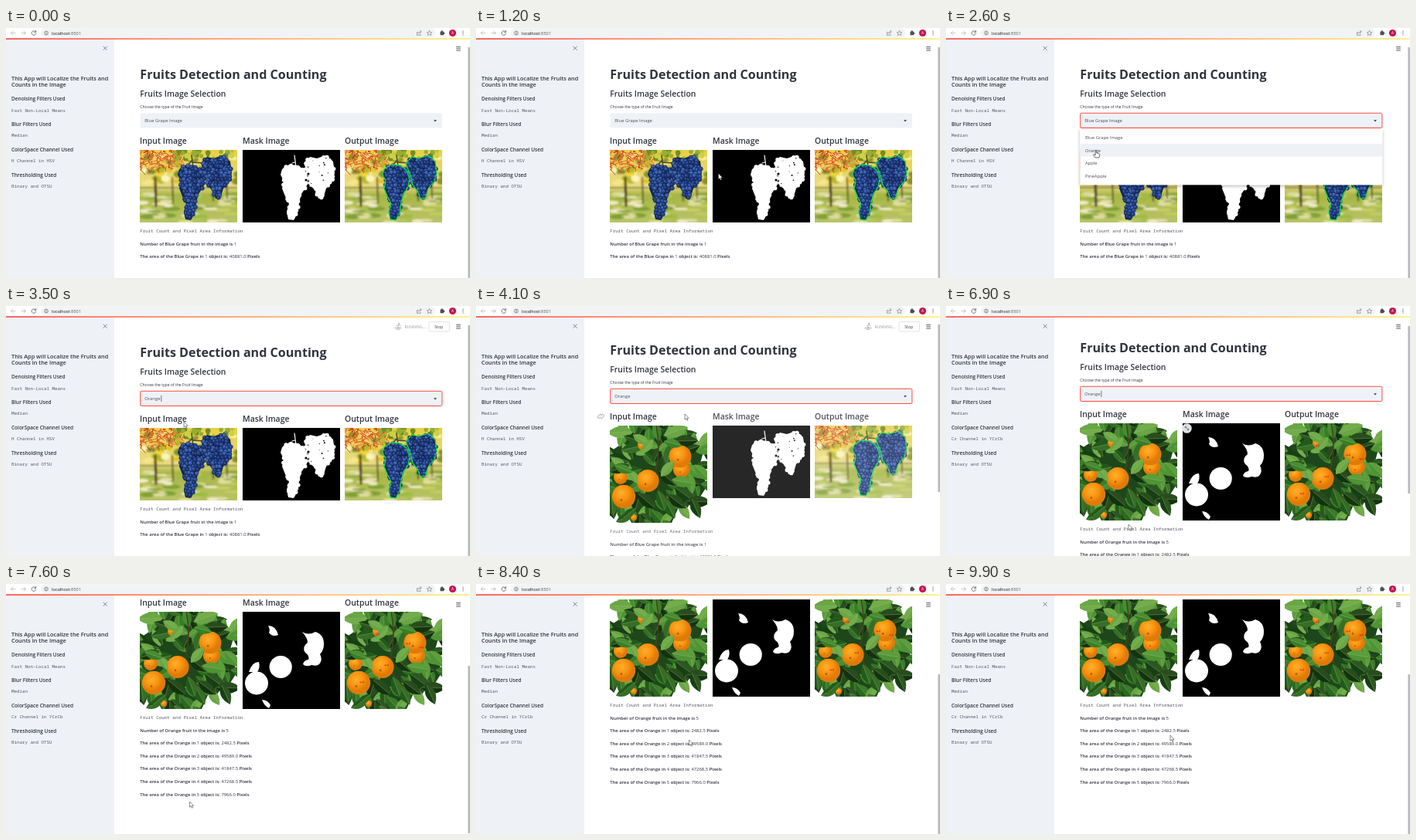
Write an HTML page that moves like this. It is 600 px wide and 324 px high and loops after 10 s.

```html
<!DOCTYPE html>
<html lang="en">
<head>
<meta charset="utf-8">
<title>Fruits Detection and Counting</title>
<style>
html, body { margin: 0; width: 100%; height: 100%; overflow: hidden; background: #fff; }
svg { display: block; width: 600px; height: 324px; }
text { font-family: "Open Sans", "Noto Sans", sans-serif; fill: #31333f; white-space: pre; }
.mono { font-family: "Noto Sans Mono", "Liberation Mono", monospace; font-size: 5.85px; fill: #555863; }
.url { font-family: Roboto, sans-serif; font-size: 5.8px; }
.h1 { font-size: 16.1px; font-weight: 700; }
.h2 { font-size: 10.45px; font-weight: 600; }
.h3 { font-size: 7.32px; font-weight: 600; }
.h4 { font-size: 6.5px; font-weight: 600; }
.body { font-size: 5.88px; font-weight: 600; }
.thin { font-weight: 400; }
.opt { font-size: 5.85px; fill: #4b4d58; }
.label { font-size: 5.06px; }
</style>
</head>
<body>
<script>
const LOOP = 10000, STEP = 100;
const COLS = [173, 306, 438], IMG_Y = 158, IMG_W = 126, GRAPE_H = 94;

let seed = 7;
const rand = (a = 0, b = 1) => {
  seed = (seed * 16807) % 2147483647;
  return a + (b - a) * seed / 2147483647;
};
const pick = list => list[Math.floor(rand(0, list.length))];
const times = (n, fn) => Array.from({ length: n }, (_, i) => fn(i)).join('');

const text = (x, y, cls, str) => `<text x="${x}" y="${y}" class="${cls}">${str}</text>`;
const rect = (x, y, w, h, fill, more = '') =>
  `<rect x="${x}" y="${y}" width="${w}" height="${h}" fill="${fill}" ${more}/>`;
const circle = (x, y, r, fill, more = '') => `<circle cx="${x}" cy="${y}" r="${r}" fill="${fill}" ${more}/>`;
const path = (d, fill, more = '') => `<path d="${d}" fill="${fill}" ${more}/>`;
const line = (d, stroke, w = 0.8) => path(d, 'none', `stroke="${stroke}" stroke-width="${w}" stroke-linecap="round"`);
const group = (id, body, more = '') => `<g id="${id}" ${more}>${body}</g>`;
// Parts between bars are set in regular weight.
const mixed = (x, y, str) => text(x, y, 'body', str.split('|')
  .map((s, i) => i % 2 ? `<tspan class="thin">${s}</tspan>` : s).join(''));

// Grapes
const bunches = [
  [[51, 25], [60, 19], [71, 20], [80, 26], [84, 37], [82, 48], [76, 57], [73, 68], [71, 82], [66, 91],
   [59, 90], [57, 80], [60, 70], [55, 60], [51, 50], [53, 40], [49, 32]],
  [[79, 17], [87, 9], [96, 11], [108, 7], [117, 15], [119, 30], [116, 41], [108, 50], [104, 63], [98, 63],
   [94, 53], [88, 46], [85, 34]],
];
const inside = (poly, x, y) => poly.reduce((hit, [ax, ay], i) => {
  const [bx, by] = poly[(i + 1) % poly.length];
  return (ay > y) !== (by > y) && x < ax + (y - ay) * (bx - ax) / (by - ay) ? !hit : hit;
}, false);
const outline = poly => 'M' + poly.map(p => p.join(' ')).join('L') + 'Z';
const grapes = [];
for (const poly of bunches)
  for (let row = 0; row < 22; row++)
    for (let col = 0; col < 17; col++) {
      const x = 48 + col * 4.5 + row % 2 * 2.2 + rand(-1.2, 1.2), y = 5 + row * 4.1 + rand(-1.2, 1.2);
      if (inside(poly, x, y)) grapes.push([x, y]);
    }
const stem = line('M67 7L69 22M67 14L62 20M68 16L84 17', '#4f4a28', 1.6);

function vineyard() {
  let s = rect(0, 0, 126, 94, 'url(#field)');
  s += '<g filter="url(#soft)">' + times(75, () =>
    `<ellipse cx="${rand(0, 126)}" cy="${rand(0, 44)}" rx="${rand(3, 8)}" ry="${rand(2, 5)}" fill="${
      pick(['#f3d535', '#e2c21f', '#b4b82f', '#fbf4b8', '#84922f', '#f5e68a'])}"/>`);
  s += times(60, () =>
    `<ellipse cx="${rand(0, 126)}" cy="${rand(56, 94)}" rx="${rand(5, 12)}" ry="${rand(1, 3)}" fill="${
      pick(['#c6cf62', '#9dbb3f', '#dfdca0', '#7fa034', '#efe9c4'])}"/>`);
  s += line('M0 49H126', '#99984d', 2);
  s += [20, 42, 94, 112].map((x, i) => line(`M${x} 36L${x + 1} ${72 - i * 3}`, '#5a4a2c', i ? 1.6 : 3.2)).join('');
  s += '</g>' + times(150, () => {
    const x = rand(0, 55), y = rand(0, 30 - x * 0.18);
    return line(`M${x} ${y}l${rand(-5, 5)} ${rand(-4, 5)}l${rand(-4, 4)} ${rand(-3, 4)}`,
      pick(['#cf3320', '#e25a28', '#b8351d', '#e98735']), 0.9);
  });
  s += times(26, () => circle(rand(46, 120), rand(0, 13), rand(2, 4), pick(['#98ad32', '#ced044', '#718c2a'])));
  s += stem + bunches.map(p => path(outline(p), '#142450')).join('');
  return s + grapes.map(([x, y]) =>
    circle(x, y, 2.6, pick(['#2a4c98', '#21408a', '#375fae', '#1c3474']), 'stroke="#142450" stroke-width=".5"') +
    circle(x - 0.6, y - 0.7, 0.8, '#7396d4', 'opacity=".6"')).join('');
}
const grapeMask = () => rect(0, 0, 126, 94, '#000') + line('M67 7L69 22M64 17L68 16', '#fff', 1.2) +
  bunches.map(p => path(outline(p), '#fff')).join('') +
  grapes.map(([x, y]) => circle(x, y, 2.6, '#fff')).join('') +
  times(14, () => circle(rand(78, 114), rand(10, 44), rand(0.4, 1.1), '#000')) +
  [[85, 31], [82, 39], [88, 49]].map(([x, y]) => circle(x, y, 1.6, '#000')).join('');
const contours = () => bunches.map(p =>
  path(outline(p), 'none', 'stroke="#14db52" stroke-width="1.5" stroke-linejoin="round" stroke-dasharray="5 .6"')).join('');

// Oranges
const GREENS = ['#173f14', '#2a6a1f', '#387f27', '#4f9434', '#12330f', '#225a1a', '#6aa645'];
function leaf(x, y, angle, len, fill) {
  const w = len * 0.46;
  return `<g transform="translate(${x} ${y}) rotate(${angle})">` +
    path(`M0 0Q${len * 0.45} ${-w} ${len} 0Q${len * 0.45} ${w} 0 0`, fill) +
    path(`M0 0Q${len * 0.45} ${-w} ${len} 0Z`, '#a4cc6a', 'opacity=".16"') +
    line(`M1 0H${len - 2}`, '#9dbf73', 0.35) + '</g>';
}
const orange = (x, y, r) => circle(x, y, r, 'url(#peel)') +
  circle(x - r * 0.2, y + r * 0.3, r * 0.09, '#a85a10');
function tree() {
  const crown = [[22, 8], [34, 0], [88, 0], [100, 18], [124, 24], [116, 52], [126, 78], [112, 100],
    [88, 108], [80, 126], [34, 126], [20, 110], [0, 106], [0, 34], [12, 26]];
  let s = rect(0, 0, 126, 126, '#fff') + path(outline(crown), '#1d471a');
  s += times(150, () => {
    const x = rand(0, 126), y = rand(0, 126), a = Math.atan2(y - 60, x - 60) * 57.3;
    const shape = leaf(x, y, a + rand(-80, 80), rand(20, 34), pick(GREENS));
    return inside(crown, x, y) ? shape : '';
  });
  s += line('M60 0Q66 30 60 55T76 96', '#4a4020', 1.6);
  s += orange(43, 25, 7) + orange(14, 67, 9) + orange(93, 57, 11) + orange(91, 40, 14.5);
  s += orange(49, 71.5, 14.6) + orange(18, 92, 15.2) + orange(31, 119, 4);
  s += [[30, 12, 30, 25], [56, 18, 130, 24], [0, 60, -20, 27], [26, 58, 60, 20], [70, 20, 15, 24], [66, 66, -50, 27],
    [102, 61, 80, 28], [80, 70, 10, 30], [36, 88, 40, 31], [33, 107, 140, 22], [6, 52, 20, 25], [62, 84, 70, 28]]
    .map(([x, y, a, l]) => leaf(x, y, a, l, pick(GREENS))).join('');
  return s;
}
const orangeMask = () => rect(0, 0, 126, 126, '#000') +
  circle(49.2, 71.5, 14.6, '#fff') + circle(18, 92.5, 15, '#fff') +
  path('M77 26Q85 31 94 26Q105 29 105 42Q105 50 100 55Q104 62 99 68Q96 71 89 69Q82 72 78 68Q79 63 85 62Q87 57 81 53Q76 46 84 40Q84 34 77 26Z', '#fff') +
  path('M33 18Q43 18 46 30Q38 33 34 27Q36 23 33 18Z', '#fff') +
  path('M8 78Q12 65 21 65Q23 72 19 78Z', '#fff') +
  path('M25 114Q32 114 36 121L34 125Q28 122 25 114Z', '#fff');
const marks = () => [[40, 29], [80, 41], [97, 46], [52, 69], [20, 91]].map(([x, y]) =>
  line(`M${x} ${y}l2 .8M${x + 4} ${y - 1}v2`, '#e42222', 1.1)).join('');

// Page pieces
const image = (col, ref, id) => `<use id="${id}" href="#${ref}" x="${COLS[col]}" y="${IMG_Y}"/>`;
const heading = (col, name) => text(COLS[col], 150, 'h2', name);
const info = (name, bottom, areas) => text(173.3, bottom + 13, 'mono', 'Fruit Count and Pixel Area Information') +
  mixed(173.3, bottom + 29.6, `Number of ${name} fruit in the image is |${areas.length}`) +
  areas.map((a, i) => mixed(173.3, bottom + 46.2 + i * 16.6,
    `The area of the ${name} in |${i + 1}| object is: |${a}| Pixels`)).join('');
const options = ['Blue Grape Image', 'Orange', 'Apple', 'PineApple'];

const defs = `<defs>
  <linearGradient id="bar"><stop stop-color="#ff4b4b"/><stop offset="1" stop-color="#fff080"/></linearGradient>
  <linearGradient id="field" x2="0" y2="1"><stop stop-color="#e8cf45"/><stop offset=".5" stop-color="#e9db85"/>
    <stop offset=".62" stop-color="#a9b546"/><stop offset="1" stop-color="#b9c467"/></linearGradient>
  <radialGradient id="peel" cx=".4" cy=".35"><stop stop-color="#ffb02e"/><stop offset=".6" stop-color="#f8930f"/>
    <stop offset="1" stop-color="#e07a08"/></radialGradient>
  <filter id="soft"><feGaussianBlur stdDeviation="1"/></filter>
  <filter id="shade" x="-10%" y="-20%" width="120%" height="150%">
    <feDropShadow dx="0" dy="1.5" stdDeviation="2.2" flood-opacity=".3"/></filter>
  <clipPath id="view"><rect y="14.8" width="600" height="310"/></clipPath>
  <clipPath id="wide"><rect width="${IMG_W}" height="${GRAPE_H}"/></clipPath>
  <clipPath id="square"><rect width="${IMG_W}" height="${IMG_W}"/></clipPath>
  ${group('grape', vineyard(), 'clip-path="url(#wide)"')}
  ${group('grapeMask', grapeMask(), 'clip-path="url(#wide)"')}
  ${group('grapeOut', '<use href="#grape"/>' + contours())}
  ${group('tree', tree(), 'clip-path="url(#square)"')}
  ${group('treeMask', orangeMask(), 'clip-path="url(#square)"')}
  ${group('treeOut', '<use href="#tree"/>' + marks())}
</defs>`;

const toolbar = rect(0, 0, 600, 13.2, '#fff') + rect(45, 0.3, 510, 12.4, '#f1f3f4', 'rx="6.2"') +
  line('M12 6.5H6.5M9 4L6.5 6.5L9 9', '#b9bcc0') + line('M20 6.5H25.5M23 4L25.5 6.5L23 9', '#b9bcc0') +
  line('M38.3 5A2.8 2.8 0 1 0 38.7 7.2M38.7 3.4V5.4H36.7', '#55585c') +
  circle(52, 6.5, 2.4, 'none', 'stroke="#5f6368" stroke-width=".7"') + line('M52 6.3V7.8M52 5.2V5.3', '#5f6368', 0.7) +
  text(59, 8.6, 'url', 'localhost<tspan fill="#6a6d72">:8501</tspan>') +
  line('M533 5.5H531.5V9.3H536V8M533 7.5Q533.5 4.8 537 4.8M535.4 3.2L537 4.8L535.4 6.4', '#6b6e73', 0.6) +
  path('M547.5 3.4l1 2.2l2.3.2l-1.8 1.5l.6 2.3l-2.1-1.3l-2.1 1.3l.6-2.3l-1.8-1.5l2.3-.2z', 'none', 'stroke="#6b6e73" stroke-width=".6"') +
  rect(561.5, 4.5, 4.6, 4.8, '#4c4f54', 'rx=".6"') + circle(563.8, 4.3, 1.1, '#4c4f54') + circle(566.3, 6.8, 1.1, '#4c4f54') +
  circle(577.5, 6.5, 4.6, '#c5154f') + `<text x="577.5" y="8.2" text-anchor="middle" style="font-size:4.6px;fill:#fff">A</text>` +
  [4.2, 6.5, 8.8].map(y => circle(591, y, 0.65, '#55585c')).join('') +
  rect(0, 13.2, 600, 1.7, 'url(#bar)');

const sidebar = rect(0, 14.5, 140, 310, '#eef2f7') + line('M126 24L130.4 28.4M130.4 24L126 28.4', '#80838c', 1) +
  text(7, 67.5, 'h3', 'This App will Localize the Fruits and') + text(7, 76.2, 'h3', 'Counts in the Image') +
  ['Denoising Filters Used', 'Blur Filters Used', 'ColorSpace Channel Used', 'Thresholding Used']
    .map((s, i) => text(7, 94 + i * 32.9, 'h4', s)).join('') +
  ['Fast Non-Local Means', 'Median', '', 'Binary and OTSU'].map((s, i) => text(7, 108.6 + i * 32.8, 'mono', s)).join('') +
  '<text id="channel" x="7" y="174.2" class="mono"></text>';

const page = text(173.3, 66, 'h1', 'Fruits Detection and Counting') + text(173.3, 88.6, 'h2', 'Fruits Image Selection') +
  text(173.3, 104, 'label', 'Choose the type of the Fruit Image') +
  rect(173.7, 110.3, 390.2, 19.2, '#eef2f7', 'id="box" rx="1.5"') +
  '<text id="choice" x="179.3" y="122.2" class="opt"></text>' +
  rect(200.6, 116, 0.6, 8, '#222', 'id="caret"') + path('M553 119.2h4l-2 2.2z', '#31333f') +
  group('anchor', line('M160.6 147.6l-1.4 1.2a1.7 1.7 0 0 1-1.2-3l1.8-1.6a1.7 1.7 0 0 1 2.4 .2M162 145l1.4-1.2a1.7 1.7 0 0 1 1.4 3l-1.8 1.6a1.7 1.7 0 0 1-2.4-.2', '#85878f', 0.8),
    'transform="translate(0 -.3)"') +
  heading(0, 'Input Image') + image(0, 'grape', 'input') +
  group('results', heading(1, 'Mask Image') + heading(2, 'Output Image') +
    image(1, 'grapeMask', 'mask') + image(2, 'grapeOut', 'output') +
    group('grapeInfo', info('Blue Grape', IMG_Y + GRAPE_H, ['40881.0'])) +
    group('orangeInfo', info('Orange', IMG_Y + IMG_W, ['2482.5', '49589.0', '41847.5', '47268.5', '7966.0']))) +
  group('zoom', circle(311.5, 164.5, 6.3, '#dfe1e6') +
    line('M309.3 164V162.3H311M313.7 165V166.7H312M309.5 162.5L313.5 166.5', '#555', 0.7)) +
  group('menu', rect(173.3, 130.3, 390.8, 73, '#fff', 'filter="url(#shade)"') +
    rect(173.3, 0, 390.8, 16.6, '#eef1f6', 'id="hover"') +
    options.map((o, i) => text(180, 143.9 + i * 16.6, 'opt', o)).join(''));

const header = group('running',
  line('M503 28.5H511M505 30.3H509M505 26L508 24L510 26M507 26V28', '#9a9ca4', 0.8) + circle(508, 22.7, 0.9, '#9a9ca4') +
  text(515.5, 29, 'label', '<tspan fill="#9a9ca4">RUNNING...</tspan>') +
  rect(547, 20.4, 26.5, 12.6, '#fff', 'rx="1.5" stroke="#d5d6dc" stroke-width=".7"') + text(554.3, 28.6, 'label', 'Stop')) +
  line('M582.6 24.5H587.4M582.6 26.8H587.4M582.6 29.1H587.4', '#4b4d58', 0.9) +
  rect(597.4, 25, 2.6, 299, '#b6b9bf', 'id="thumb"');

const arrow = path('M0 0V7.2L1.6 5.7L2.8 8.3L4 7.8L2.9 5.3H5.1Z', '#fff', 'id="arrow" stroke="#444" stroke-width=".6"');
const hand = path('M-.8 .6Q0-.5.8 .6V4L4 4.8Q5 5.2 4.8 6.6L4 10H-1L-3.4 6.6Q-3.4 5.4-2.2 5.8L-.8 7Z', '#fff',
  'id="hand" stroke="#333" stroke-width=".7"');

document.body.innerHTML = `<svg viewBox="0 0 600 324">${defs}<rect width="600" height="324" fill="#fff"/>
  <g clip-path="url(#view)">${group('page', page)}</g>${sidebar}${header}${toolbar}${group('cursor', arrow + hand)}</svg>`;

// Motion: rows are [time, values...]
const pointer = [[300, 604, 90], [1100, 330, 200], [1800, 215, 121], [2000, 200, 120], [2300, 196, 140], [2600, 194, 158],
  [3050, 193, 157], [3500, 230, 150], [4100, 270, 140], [4900, 283.5, 145], [5300, 300, 165], [5800, 250, 220],
  [6200, 360, 215], [6500, 350, 205], [6900, 236, 283], [7600, 237.5, 282], [8000, 237.5, 282], [8500, 285, 182],
  [9200, 283, 190], [9900, 290, 196]];
const scroll = [[3600, 0], [3700, 3], [4300, 3], [4400, 6], [7100, 6], [7200, 12], [7300, 28], [7400, 58], [7500, 96],
  [7600, 122], [7700, 134], [7800, 138]];
function at(rows, t) {
  const i = rows.findIndex(r => r[0] > t);
  if (i < 0) return rows[rows.length - 1].slice(1);
  if (!i) return rows[0].slice(1);
  const a = rows[i - 1], b = rows[i], k = (t - a[0]) / (b[0] - a[0]);
  return a.slice(1).map((v, j) => v + (b[j + 1] - v) * k);
}
const $ = id => document.getElementById(id);
const set = (id, name, value) => $(id).setAttribute(name, value);
const show = (id, on) => set(id, 'display', on ? 'inline' : 'none');

function draw(t) {
  const [x, y] = at(pointer, t), [s] = at(scroll, t);
  const open = t >= 2000 && t < 3100, chosen = t >= 3100, loaded = t >= 3700, done = t >= 4400;

  set('page', 'transform', `translate(0 ${-s})`);
  set('thumb', 'y', 15 + (s + 10) * (loaded ? 0.69 : 1));
  set('thumb', 'height', loaded ? 217 : 299);

  set('box', 'stroke', t >= 2000 ? '#ff4b3e' : 'none');
  $('choice').textContent = options[chosen ? 1 : 0];
  show('caret', t >= 3250 && (t - 3250) % 1060 < 530);
  show('menu', open);
  set('hover', 'y', 133.4 + 16.6 * (y < 150 ? 0 : 1));
  show('running', t >= 3300 && !done);

  set('input', 'href', loaded ? '#tree' : '#grape');
  set('mask', 'href', done ? '#treeMask' : '#grapeMask');
  set('output', 'href', done ? '#treeOut' : '#grapeOut');
  set('results', 'opacity', done ? 1 : Math.min(1, 1 - 0.15 * (t - 3900) / 200));
  set('grapeInfo', 'transform', `translate(0 ${loaded ? IMG_W - GRAPE_H : 0})`);
  show('grapeInfo', !done);
  show('orangeInfo', done);
  $('channel').textContent = done ? 'Cr Channel in YCrCb' : 'H Channel in HSV';

  show('anchor', t >= 3700 && t < 5200);
  show('zoom', t >= 6100 && t < 7000);
  show('cursor', t >= 300);
  set('cursor', 'transform', `translate(${x} ${y})`);
  const pointing = t >= 1700 && t < 3100;
  show('hand', pointing);
  show('arrow', !pointing);
}

const start = performance.now();
function tick(now) {
  const t = Math.max(0, now - start) % LOOP;
  draw(Math.floor(t / STEP) * STEP);
  requestAnimationFrame(tick);
}
draw(0);
requestAnimationFrame(tick);
</script>
</body>
</html>
```
